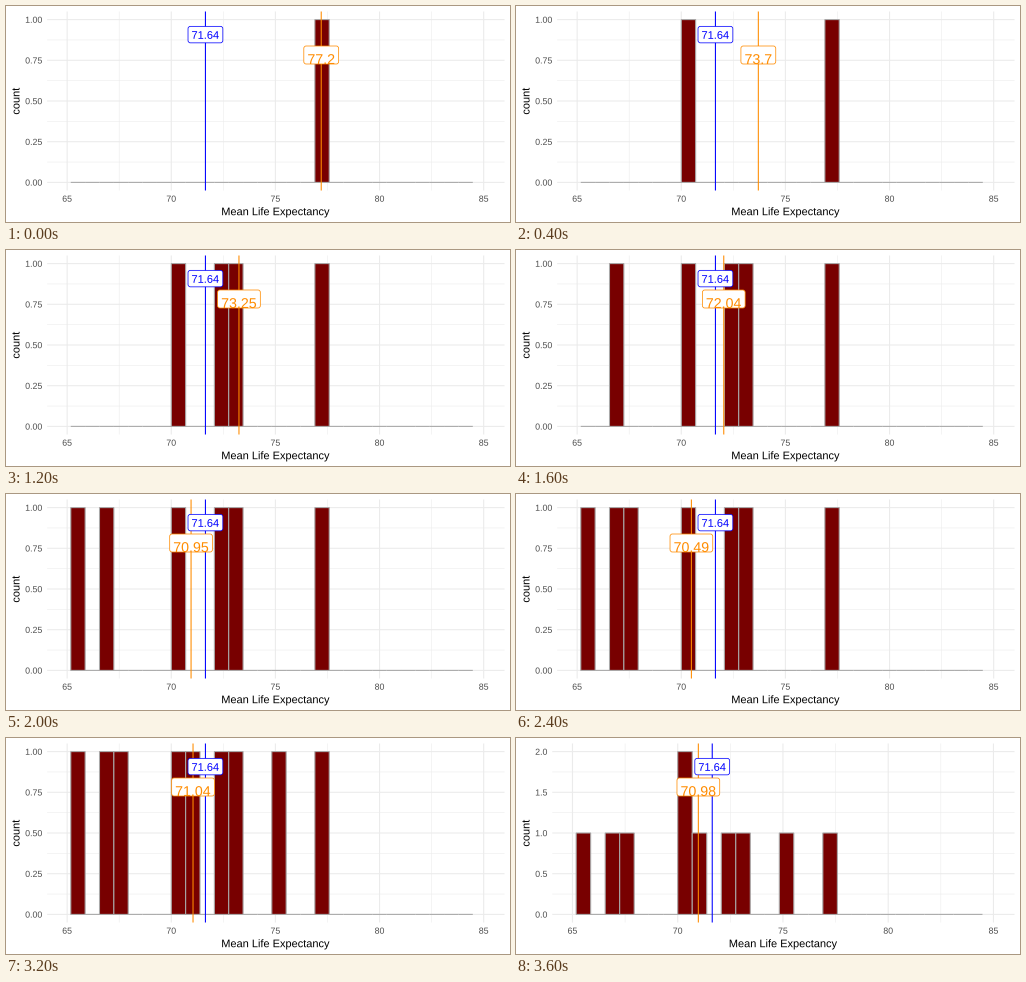
Recreate the animation shown at these times as a matplotlib script. Size 504 by 216 pixels, loop 4000 ms.

```python
import matplotlib.pyplot as plt
import numpy as np
from matplotlib.animation import FuncAnimation
from matplotlib.patches import FancyBboxPatch, PathPatch, Rectangle
from matplotlib.textpath import TextPath
from matplotlib.transforms import Affine2D

plt.rcParams["font.family"] = "Liberation Sans"
plt.rcParams["path.snap"] = False

W, H = 504, 216
TOP, BOTTOM, RIGHT = 5.5, 184.5, 498.5
BASE, PEAK = 176.4, 13.6
X_MIN, X_SPAN = 64.04, 21.96
BIN_START, BIN_WIDTH, BINS = 65.175, 0.6894, 28
POP_MEAN = 71.64
SAMPLE = [77.2, 70.2, 73.0, 72.6, 67.2, 65.5, 67.7, 75.0, 71.0, 70.4]
BLUE, ORANGE, GRID = "#0000ff", "#ff8c00", "#ebebeb"

fig = plt.figure(figsize=(W / 72, H / 72), dpi=72, facecolor="white")
ax = fig.add_axes([0, 0, 1, 1])


def line(x, y, color, lw=1.07, z=1):
    ax.plot(x, y, color=color, lw=lw, zorder=z, solid_capstyle="butt")


def write(x, y, s, size, color="black", align=0.5, angle=0):
    """Outline text with its baseline at y, keeping fractional positions."""
    path = TextPath((0, 0), s, size=size)
    box = path.get_extents()
    shift = box.x0 + align * box.width
    place = Affine2D().translate(-shift, 0).scale(1, -1)
    place.rotate_deg(-angle).translate(x, y)
    ax.add_patch(PathPatch(place.transform_path(path), fc=color, lw=0, zorder=6))


def tag(x, y, s, size, color, h, baseline):
    """Rounded white label; its width follows the text's own advance."""
    w = size * sum(0.278 if c == "." else 0.556 for c in s) + 7.2
    ax.add_patch(FancyBboxPatch(
        (x - w / 2, y - h / 2), w, h, boxstyle="round,pad=0,rounding_size=2.4",
        fc="white", ec=color, lw=0.75, zorder=5))
    write(x, baseline, s, size, color)


def draw(i):
    ax.clear()
    ax.set(xlim=(0, W), ylim=(H, 0))
    ax.axis("off")

    data = np.array(SAMPLE[:i + 1])
    edges = BIN_START + BIN_WIDTH * np.arange(BINS + 1)
    counts, _ = np.histogram(data, edges)
    top = counts.max()
    left = 41.15 if top == 1 else 36.26

    def px(v):
        return left + (v - X_MIN) * (RIGHT - left) / X_SPAN

    def py(v):
        return BASE - (BASE - PEAK) * v / top

    for k in range(4):
        line([px(67.5 + 5 * k)] * 2, [TOP, BOTTOM], GRID, 0.53)
        line([left, RIGHT], [py(top * (k + 0.5) / 4)] * 2, GRID, 0.53)
    for k in range(5):
        x, y = px(65 + 5 * k), py(top * k / 4)
        line([x, x], [TOP, BOTTOM], GRID)
        line([left, RIGHT], [y, y], GRID)
        write(x, 195.7, str(65 + 5 * k), 8.8, "#4d4d4d")
        value = f"{top * k / 4:.{3 - top}f}"
        write(left - 5.2, y + 3.2, value, 8.8, "#4d4d4d", align=1)

    for a, b, n in zip(edges, edges[1:], counts):
        ax.add_patch(Rectangle((px(a), py(n)), px(b) - px(a), BASE - py(n),
                               fc="#780000", ec="#a9a9a9", lw=1.07, zorder=2))

    mean = data.mean()
    line([px(POP_MEAN)] * 2, [TOP, BOTTOM], BLUE, z=3)
    line([px(mean)] * 2, [TOP, BOTTOM], ORANGE, z=4)
    tag(px(POP_MEAN), 28.6, f"{POP_MEAN}", 11.04, BLUE, 16.5, 32.8)
    tag(px(mean), 49, f"{round(mean, 2):g}", 14.2, ORANGE, 18, 58)

    write((left + RIGHT) / 2, 209.2, "Mean Life Expectancy", 11)
    write(13.5, 95, "count", 11, angle=90)


anim = FuncAnimation(fig, draw, frames=len(SAMPLE), init_func=lambda: None,
                     interval=400, repeat=True, repeat_delay=0)
plt.show()
```
